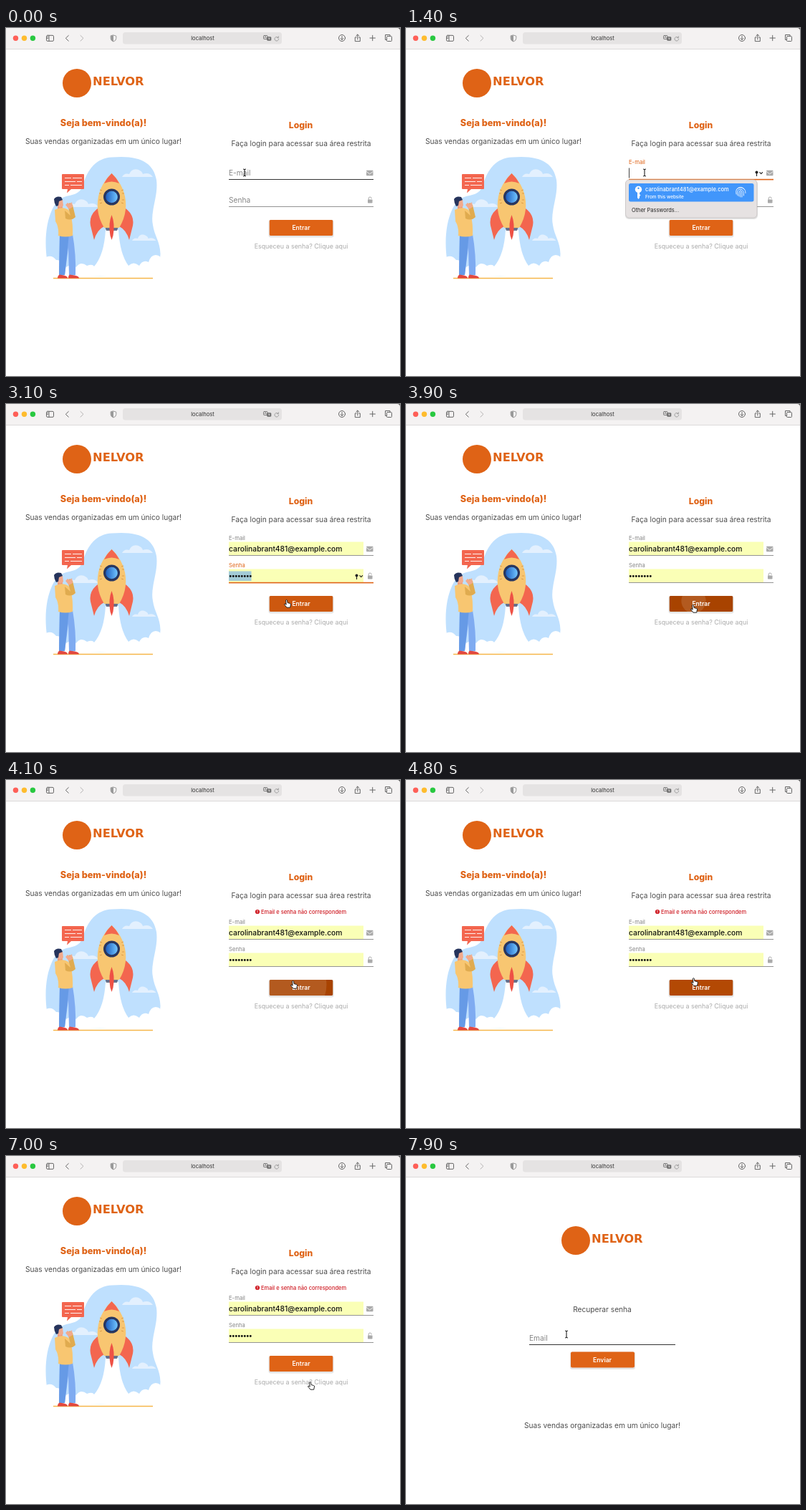
An HTML page that plays this animation: 550x486 px, repeating every 8 s.

```html
<!DOCTYPE html>
<html lang="pt">
<head>
<meta charset="utf-8">
<title>Login</title>
<style>
html, body { margin: 0; width: 100%; height: 100%; overflow: hidden; background: #fff; }
svg { display: block; width: 550px; height: 486px; font: 10.2px Inter, sans-serif; fill: #4d4d4d; }
.mid { text-anchor: middle; }
.icon { fill: none; stroke: #666; stroke-width: 1; stroke-linecap: round; stroke-linejoin: round; }
.grey { fill: #aaa; }
.orange { fill: #df6316; }
.title { font-size: 12.7px; font-weight: 800; fill: #df6316; }
.brand { font: 700 16.3px "DejaVu Sans", sans-serif; fill: #df6316; }
.button-text { font-size: 8.6px; font-weight: 600; fill: #fff; }
.value { fill: #111; font-weight: 500; font-size: 10.3px; }
</style>
</head>
<body>
<svg viewBox="0 0 550 486">
  <defs>
    <g id="logo"><circle cx="99" cy="77" r="20" class="orange"/><text x="121" y="80" class="brand">NELVOR</text></g>
    <g id="cloud"><path d="M0 0q3-6 10-4q4-9 13-6q5 2 6 6q9-3 14 4z" fill="#e3f0fe"/></g>
    <g id="shadow" fill="#000" opacity=".1"><rect x="-.5" y=".5" width="90" height="23" rx="2.5"/><rect x="-1" y="0" width="91" height="24.5" rx="3"/></g>
    <g id="key"><circle cx="178.5" cy="-10" r="2" fill="#222"/><path d="M178.5-9v4M182.8-9.8l1.9 1.9l1.9-1.9" class="icon" style="stroke:#222;stroke-width:1.2"/></g>
    <clipPath id="buttonClip"><rect width="89" height="22" rx="2"/></clipPath>
    <linearGradient id="glass" x2="1"><stop stop-color="#1e5fc0"/><stop offset="1" stop-color="#72c6ff"/></linearGradient>
  </defs>

  <rect width="550" height="486" fill="#fff"/>
  <path d="M546 0h4v4z" fill="#555"/>
  <path d="M0 0H546Q550 0 550 4V29.5H0z" fill="#f4f2f2"/>
  <path d="M0 29.5H550" stroke="#dcdada"/>
  <circle cx="13.5" cy="14.3" r="3.7" fill="#fe5f57"/><circle cx="25.5" cy="14.3" r="3.7" fill="#febc2e"/><circle cx="37.4" cy="14.3" r="3.7" fill="#28c840"/>
  <rect x="163" y="6" width="222" height="16.5" rx="3.5" fill="#e5e3e3"/>
  <text x="274.5" y="17" class="mid" style="font-size:7.6px;fill:#333">localhost</text>
  <g class="icon">
    <rect x="56.5" y="10.3" width="10" height="8" rx="1.5"/><path d="M60 10.3v8M57.7 12.5h1M57.7 14.5h1"/>
    <path d="M87.3 10.5l-4 3.8l4 3.8"/><path d="M104 10.5l4 3.8l-4 3.8" stroke="#b5b3b3"/>
    <path d="M150 10l3.8 1.2v3.3q0 3-3.8 4.5q-3.8-1.5-3.8-4.5v-3.3z" stroke="#999"/><path d="M150 10v9q-3.8-1.5-3.8-4.5v-3.3z" fill="#999" stroke="none"/>
    <rect x="359.5" y="10.5" width="5.5" height="5" rx="1" stroke-width=".8"/><path d="M361 14l1.2-2.5l1.2 2.5" stroke-width=".7"/><rect x="364.5" y="12.5" width="5.5" height="5" rx="1" fill="#666" stroke-width=".5"/><path d="M366 14h2.5l-2 2.2m.3-1.5l1.7 1.5" stroke="#e5e3e3" stroke-width=".7"/>
    <path d="M380 13.5a2.8 2.8 0 1 0 .6 2M380.4 11.8v1.900h-1.900" stroke="#999" stroke-width=".9"/>
    <circle cx="469" cy="14" r="4.5"/><path d="M469 11.5v5l-2-2m2 2l2-2"/>
    <path d="M489 13h-1.7v5.6h7V13h-1.7M490.8 16V9l-2 2m2-2l2 2"/>
    <path d="M508 14h7.4M511.7 10.3v7.4"/><path d="M531 16.5h-1.5v-7h6.5v1.5"/><rect x="531.5" y="11.5" width="7" height="7" rx="1"/>
  </g>

  <g id="login">
    <use href="#logo"/>
    <text x="136" y="137" class="mid title">Seja bem-vindo(a)!</text>
    <text x="136" y="162" class="mid">Suas vendas organizadas em um único lugar!</text>

    <path d="M57 322C53 292 57 262 70 244C84 228 101 240 108 218C113 199 126 181 148 180.5C188 177 206 189 210 212C213 235 201 256 205 275C207 290 215 298 215.5 315Q216 328 206 338Q145 352 75 342Q61 338 57 322z" fill="#bfe0fe"/>
    <use href="#cloud" x="86" y="250"/><use href="#cloud" x="162" y="208"/><use href="#cloud" transform="translate(176 297) scale(.78)"/>
    <path d="M139 282h18q2 34 14 50q7-7 15 0q5-9 13-5q3-10 10-10q8 0 9 10v19H56v-26q8-4 14 4q9-1 14 10q8-6 14 0q6-9 15-2q8-3 10 1q14-16 16-51z" fill="#fff"/>
    <path d="M66 349.500H205" stroke="#f6b64a" stroke-width="1.6"/>

    <path d="M131 250q-16 10-13 26l5 20q4-14 14-19zM164 250q16 10 13 26l-5 20q-4-14-14-19z" fill="#f3664f"/>
    <path d="M138 277h19l-2 6h-15z" fill="#66718c"/>
    <path d="M147.5 203C125 224 122 255 137 279H158C173 255 170 224 147.5 203z" fill="#f8c671"/>
    <path d="M147.5 203Q141 209 137 217Q147.5 212 158 217Q154 209 147.5 203z" fill="#f3664f"/>
    <path d="M147.5 261q-5 12-2 29l2 6l2-6q3-17-2-29z" fill="#ee5145"/>
    <circle cx="147.5" cy="236" r="11.5" fill="#28365f"/><circle cx="147.5" cy="236" r="8.3" fill="url(#glass)"/>
    <path d="M131 226l3 1M130 231h3M130 240h3M131 245l3-1M164 226l-3 1M165 231h-3M165 240h-3M164 245l-3-1" stroke="#de9c48"/>

    <path d="M79 204h29q1 0 1 1v19q0 1-1 1H91l-6 5.500l1-5.500h-7q-1 0-1-1v-19q0-1 1-1z" fill="#f3664f"/>
    <path d="M82 209.500h9m2 0h13M82 214.500h15m2 0h7M82 219.500h6m2 0h16" stroke="#fff" stroke-width="1.2" opacity=".9"/>

    <path d="M75 288l-1 57h8l5-38l1 38h9q1-28-4-57z" fill="#7fabf1"/><path d="M75 288l-1 57h8l6-57z" fill="#669ae6"/>
    <path d="M72 349.500q0-4 3-5l6 1q5 1 5 4zM87 349.500q0-4 2-5l7 1q6 1 6 4z" fill="#e2473f"/>
    <path d="M72 246h7v8h-7z" fill="#ec9d7f"/>
    <path d="M68 254q12-6 20 1q6 12 5 35q-10 3-20 0q1-12-4-20z" fill="#f8c671"/>
    <path d="M82 255l8 7l-4-14l3-4l4 3l4 17q-6 6-14 2z" fill="#e0ab4f"/>
    <path d="M83 247l3-3l3 2l3-3l1 7l-5 3z" fill="#f2aa8c"/>
    <path d="M71 240h8l1 8q-2 3-6 2l-4-4z" fill="#f2aa8c"/>
    <path d="M67 239q3-5 10-3l2 4l-5 2l-1 6l-3 1q-3-5-3-10z" fill="#26345c"/>

    <text x="411.5" y="140" class="mid title" style="font-size:12.2px">Login</text>
    <text x="412" y="165" class="mid">Faça login para acessar sua área restrita</text>
    <g id="error" fill="#cf1c24"><circle cx="351" cy="184" r="3.1"/><path d="M351 182v2.300M351 185.200v.8" stroke="#fff" stroke-width=".9"/><text x="356" y="186.8" style="font-size:7.5px;font-weight:500">Email e senha não correspondem</text></g>
    <g id="form">
      <g id="fields"></g>
      <g transform="translate(367.5 268)">
        <use href="#shadow"/>
        <g clip-path="url(#buttonClip)"><rect id="enter" width="89" height="22"/><circle id="ripple" cx="34" cy="7" fill="#fff"/></g>
        <text x="44.5" y="14.3" class="mid button-text">Entrar</text>
      </g>
      <text x="412" y="308" class="mid grey" style="font-size:8.9px">Esqueceu a senha? Clique aqui</text>
    </g>
    <g id="popup">
      <rect x="306" y="213" width="185" height="54" rx="5" fill="#000" opacity=".12"/>
      <rect x="306.5" y="212" width="183.5" height="53" rx="5" fill="#e6e2e2" stroke="#c3bfbf" stroke-width=".7"/>
      <rect x="311" y="217" width="174.5" height="25.5" rx="2.5" fill="#4196fb"/>
      <g fill="#fff"><circle cx="324.5" cy="225.5" r="4.7"/><path d="M323 229h3v3l1.500 1.500l-1.500 1.500v2l-1.500 2l-1.500-2z"/><circle cx="324.5" cy="223.8" r="1.2" fill="#4196fb"/>
        <text x="334" y="228.3" style="font-size:7.6px;font-weight:500">carolinabrant481@example.com</text><text x="334" y="237.7" style="font-size:6.4px;font-weight:500">From this website</text></g>
      <path d="M461 232q-2-9 6-9.500q7 .5 7 8M463 234q-2-9 4-9q5 .5 4.500 9M465 235q-1-8 2-8q3 0 2 9M467 229v7M462 225q5-5 10 0" class="icon" style="stroke:#fff;stroke-width:.8"/>
      <text x="315" y="257" style="font-size:7.4px;fill:#222">Other Passwords...</text>
    </g>
  </g>

  <g id="recover">
    <use href="#logo" x="138" y="41"/>
    <text x="274" y="218" class="mid">Recuperar senha</text>
    <text x="172" y="258" style="fill:#858585">Email</text>
    <path id="recoverLine" d="M172 263.500H376"/>
    <g transform="translate(230 273.5)"><use href="#shadow"/><rect width="89" height="22" rx="2" class="orange"/><text x="44" y="14.3" class="mid button-text">Enviar</text></g>
    <text x="274" y="380" class="mid">Suas vendas organizadas em um único lugar!</text>
  </g>

  <g id="cursor" stroke-linejoin="round">
    <path id="beam" d="M-2-5q2 0 2 1.500q0-1.500 2-1.500M0-4V4M-2 5q2 0 2-1.500q0 1.500 2 1.500" fill="none" stroke="#222" stroke-width="1.1"/>
    <path id="hand" d="M-2.500-5q1-1.200 2 0l.5 3.500l3.500 1q1.200.3 1 1.500l-.8 4.200h-4.700l-3.300-4q-.5-1.800 1.600-.7l.9.700z" fill="#fff" stroke="#111" stroke-width=".9"/>
    <path id="arrow" d="M-3-6v10.500l2.500-2.300l1.700 3.800l1.600-.7l-1.700-3.600h3.400z" fill="#111" stroke="#fff" stroke-width=".8"/>
  </g>
</svg>
<script>
const LOOP = 8000, STEP = 100, SHIFT = 11;
const $ = id => document.getElementById(id);
const show = (id, on) => { $(id).style.display = on ? '' : 'none'; };
const clamp = v => Math.min(1, Math.max(0, v));
const progress = (t, from, to) => clamp((t - from) / (to - from));
const ease = p => p * p * (3 - 2 * p);
const mix = (a, b, p) => a + (b - a) * p;
const within = (v, a, b) => v >= a && v < b;

// Fields have their origin at the left end of the underline.
const field = (id, y, label, value, icon, extra = '') => `<g transform="translate(311 ${y})">
  <g id="${id}Value"><rect y="-19" width="188" height="18.5" fill="#faffb6"/>${value}</g>
  <text id="${id}Label">${label}</text>${extra}
  <path id="${id}Line" d="M0 0H202"/>
  <rect id="${id}Focus" y="-.7" height="1.6" class="orange"/>
  <use id="${id}Key" href="#key"/>${icon}</g>`;

$('fields').innerHTML =
  field('email', 211.5, 'E-mail', '<text y="-5.2" class="value">carolinabrant481@example.com</text>',
    '<rect x="192" y="-12.7" width="9.5" height="7.5" rx="1" class="grey"/><path d="M192-11.200l4.700 3.700l4.800-3.700" fill="none" stroke="#fff" stroke-width=".8"/>',
    '<path id="caret" d="M.5-16V-2" stroke="#444"/>') +
  field('senha', 249.5, 'Senha', '<rect id="selection" y="-16" width="31.5" height="13.5" fill="#a3cbd6"/><path d="M2.300-9H31" stroke="#111" stroke-width="2.9" stroke-linecap="round" stroke-dasharray="0 4"/>',
    '<rect x="194" y="-10" width="6.5" height="5" rx=".7" class="grey"/><path d="M195.200-10v-1.500a2 2 0 0 1 4 0" class="icon" style="stroke:#aaa"/>');

const path = [
  [0, 333, 202], [1500, 333, 202], [2000, 385, 231], [2300, 385, 231], [3000, 393, 279],
  [3400, 393, 279], [3700, 402, 286], [4700, 402, 286], [5400, 417, 217], [5600, 417, 217],
  [6200, 426, 321], [7000, 426, 321], [7100, 405, 316], [7400, 405, 316], [7900, 224, 249], [LOOP, 224, 249]
];

function pointer(t) {
  const i = path.findIndex(k => k[0] > t), a = path[i - 1], b = path[i];
  const p = ease(progress(t, a[0], b[0]));
  return [mix(a[1], b[1], p), mix(a[2], b[2], p)];
}

function drawField(id, t, floatAt, focusAt, blurAt, hover) {
  const focused = within(t, focusAt, blurAt);
  const p = ease(progress(t, floatAt, floatAt + 200));
  const label = $(id + 'Label');
  label.setAttribute('transform', `translate(0 ${mix(-5.3, -21.3, p)}) scale(${mix(1, .755, p)})`);
  label.style.fill = focused ? '#df6316' : '#858585';
  $(id + 'Line').setAttribute('stroke', hover ? '#333' : '#949494');
  const width = focused ? 202 * ease(progress(t, focusAt - 50, focusAt + 200)) : 0;
  $(id + 'Focus').setAttribute('x', 101 - width / 2);
  $(id + 'Focus').setAttribute('width', width);
  show(id + 'Key', focused && t >= focusAt + 100);
  show(id + 'Value', t >= 2100);
}

function draw(t) {
  const [x, y] = pointer(t);
  const login = t < 7100, failed = t >= 4000, popup = within(t, 300, 2100);
  const shift = failed ? SHIFT : 0, fy = y - shift;
  show('login', login);
  show('recover', !login);
  show('popup', popup);
  $('popup').style.opacity = progress(t, 200, 400);
  show('error', failed);
  $('form').setAttribute('transform', `translate(0 ${shift})`);

  const overEmail = login && within(x, 311, 513) && within(fy, 192, 212);
  const overSenha = login && !popup && within(x, 311, 513) && within(fy, 230, 250);
  const overEnter = login && within(x, 368, 457) && within(fy, 268, 291);
  const overLink = login && within(x, 347, 477) && within(fy, 302, 315);
  const overRecover = !login && within(x, 172, 376) && within(y, 245, 266);

  drawField('email', t, 100, 100, 2100, overEmail);
  drawField('senha', t, 2000, 2100, 3900, overSenha);
  show('caret', within(t, 100, 700) || within(t, 900, 1200) || within(t, 1400, 2100));
  show('selection', t < 3900);

  const dark = progress(t, 3050, 3200) - progress(t, 4750, 5000);
  $('enter').setAttribute('fill', `rgb(${mix(223, 168, dark)} ${mix(99, 67, dark)} ${mix(22, 0, dark)})`);
  $('ripple').setAttribute('r', t < 3900 ? 0 : mix(10, 82, progress(t, 3850, 4350)));
  $('ripple').style.opacity = .12 * (1 - progress(t, 4200, 4700));

  $('recoverLine').setAttribute('stroke', overRecover ? '#333' : '#949494');
  const shape = overEnter || overLink ? 'hand' : overEmail || overSenha || overRecover ? 'beam' : 'arrow';
  ['beam', 'hand', 'arrow'].forEach(id => show(id, id === shape));
  $('cursor').setAttribute('transform', `translate(${x} ${y})`);
}

const start = performance.now();
function tick() {
  const t = (performance.now() - start) % LOOP;
  draw(Math.floor(t / STEP) * STEP);
  requestAnimationFrame(tick);
}
tick();
</script>
</body>
</html>
```
